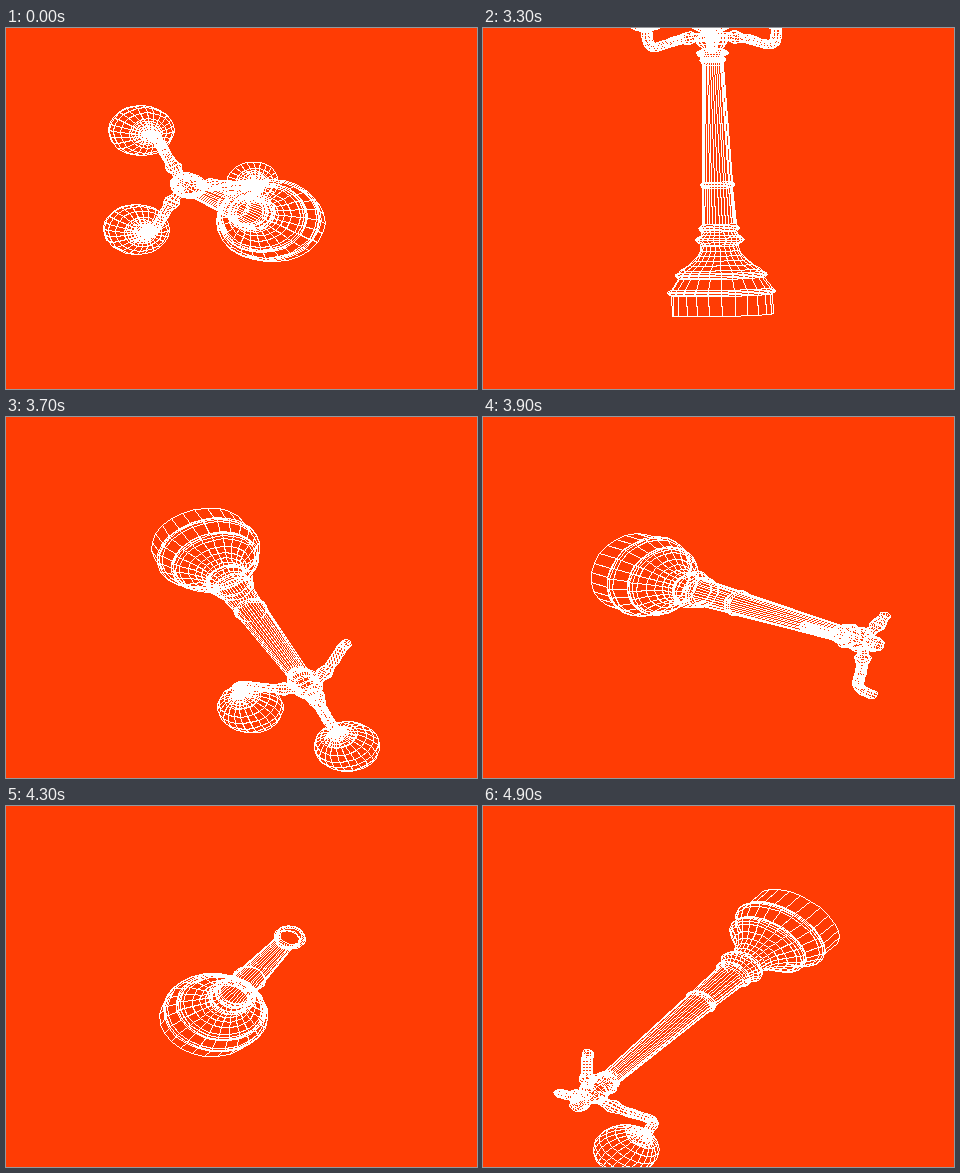
An HTML page with a canvas for the animation above (5 s loop, 471 by 361 pixels).

```html
<!DOCTYPE html>
<html>
<head>
<meta charset="utf-8">
<style>
html, body { margin: 0; width: 100%; height: 100%; overflow: hidden; background: #ff3c04; }
canvas { display: block; }
</style>
</head>
<body>
<canvas id="stage" width="471" height="361"></canvas>
<script>
const W = 471, H = 361, MID = W / 2, SQUASH = H / W;
const LOOP = 5000, HOLD = 3000, STEP = 100;
const REACH = 75, GLOBE = 33;
const OUTER = -1, INNER = 1, BOTH = 0;   // which faces of a mesh are drawn
const ctx = document.getElementById('stage').getContext('2d');
const image = ctx.createImageData(W, H);
const pixels = new Uint32Array(image.data.buffer);
const BACK = 0xff043cff, INK = 0xffffffff;

const mix = (a, b, k) => a + (b - a) * k;
const mixAll = (a, b, k) => a.map((v, i) => mix(v, b[i], k));
const dot = (a, b) => a[0] * b[0] + a[1] * b[1] + a[2] * b[2];
const scale = (a, k) => a.map(v => v * k);
const add = (a, b) => a.map((v, i) => v + b[i]);
const unit = a => scale(a, 1 / Math.hypot(...a));
const cross = (a, b) => [a[1] * b[2] - a[2] * b[1], a[2] * b[0] - a[0] * b[2], a[0] * b[1] - a[1] * b[0]];

function slerp(a, b, k) {
  a = unit(a);
  b = unit(b);
  const angle = Math.acos(dot(a, b)), s = Math.sin(angle);
  return add(scale(a, Math.sin((1 - k) * angle) / s), scale(b, Math.sin(k * angle) / s));
}

// Turned profiles are lists of [height, radius]
const curve = (n, fn) => Array.from({ length: n + 1 }, (_, i) => fn(i / n));
const bead = (h, r, bulge, half) =>
  curve(4, k => [h + half * (2 * k - 1), r + bulge * Math.sin(Math.PI * k)]);
const flare = (h0, h1, r0, r1) => curve(5, k => [mix(h0, h1, k), r1 + (r0 - r1) * (1 - k) ** 2]);

const BASE = [[-139, 50.5], ...bead(-109, 50.5, 3.5, 4), ...bead(-87, 43, 3, 4),
  ...flare(-80, -49, 40, 19), ...bead(-41, 18.5, 6, 6), ...bead(-26, 17.5, 3, 4)];
const SHAFT = [[-20, 17], ...bead(31, 15, 2, 4), [187, 10.5], ...bead(194, 11, 2, 3), ...bead(203, 11, 5, 5)];
const HUB = [...bead(220, 10, 6, 11), ...bead(243, 7, 3, 8)];
const FINIAL = [[251, 7], ...bead(278, 7, 8, 6)];
const CUP = curve(4, k => [231 + 11 * k, 5 + 11 * k]);
const SPHERE = curve(10, k => [-GLOBE * Math.cos(Math.PI * k), GLOBE * Math.sin(Math.PI * k)]);
// Arm centre line with tube radius: a dip, an upturned end and one knob
const ARM = curve(20, k => {
  const d = 10 + (REACH - 10) * Math.sin(k * Math.PI / 2);
  const h = 224 + 9 * k ** 3 - 16 * Math.sin(Math.PI * k * k);
  return [d, h, 5.5 + 3.5 * Math.exp(-(((d - 27) / 4) ** 2))];
});

// axis: post direction, side: first arm, hub: 0..1,
// grown: each arm (0..1) and then its globe (1..2); the last one is the top globe
const pose = (t, axis, side, hub, grown) => ({ t, axis, side, hub, grown });
const REST = pose(0, [-.25, -.14, -.957], [.96, 0, -.27], 1, [1.25, 2, 2, 0]);
const POSES = [
  pose(3000, [.193, .75, -.63], [.97, -.05, .24], 1, [2, 2, 2, 2]),
  pose(3300, [-.03, -1, -.04], [0, 0, -1], 1, [2, 2, 2, 2]),
  pose(3700, [.3, .53, -.79], [.36, .74, .58], 1, [2, .75, 2, 0]),
  pose(4100, [.85, -.085, -.52], [0, 1, -.16], 0, [0, 0, 0, 0]),
  pose(4600, [-.8, -.3, -.52], [.44, -.82, -.2], 0, [1.28, 0, 0, 0]),
  pose(4900, [-.57, .63, -.53], [.8, .63, -.11], 1, [2, .65, .65, 0])
];

function poseAt(t) {
  if (t < HOLD) return REST;
  const i = POSES.findIndex(p => p.t >= t);
  if (POSES[i].t === t) return POSES[i];
  const p = POSES[i - 1], q = POSES[i], k = (t - p.t) / (q.t - p.t);
  return pose(t, slerp(p.axis, q.axis, k), mixAll(p.side, q.side, k),
    mix(p.hub, q.hub, k), mixAll(p.grown, q.grown, k));
}

// Hard-edged line one pixel wide
function line(p, q) {
  let x = Math.floor(MID + p[0]), y = Math.floor((MID + p[1]) * SQUASH);
  const x1 = Math.floor(MID + q[0]), y1 = Math.floor((MID + q[1]) * SQUASH);
  const dx = Math.abs(x1 - x), dy = -Math.abs(y1 - y);
  const sx = x < x1 ? 1 : -1, sy = y < y1 ? 1 : -1;
  let err = dx + dy;
  for (;;) {
    if (x >= 0 && x < W && y >= 0 && y < H) pixels[y * W + x] = INK;
    if (x === x1 && y === y1) return;
    const e = 2 * err;
    if (e >= dy) { err += dy; x += sx; }
    if (e <= dx) { err += dx; y += sy; }
  }
}

function ring(centre, u, v, r, count) {
  return Array.from({ length: count }, (_, i) => {
    const a = i / count * 2 * Math.PI;
    return add(centre, add(scale(u, r * Math.cos(a)), scale(v, r * Math.sin(a))));
  });
}

function mesh(rings, faces) {
  for (let j = 1; j < rings.length; j++) {
    const low = rings[j - 1], high = rings[j];
    low.forEach((a, i) => {
      const n = (i + 1) % low.length, b = low[n], c = high[n], d = high[i];
      // z of the face normal, from the two diagonals
      const z = (c[0] - a[0]) * (d[1] - b[1]) - (c[1] - a[1]) * (d[0] - b[0]);
      if (z * faces < 0) return;
      line(a, b);
      line(b, c);
      line(c, d);
      line(d, a);
    });
  }
}

function lathe(profile, count, faces, origin, [axis, u, v]) {
  mesh(profile.map(([h, r]) => ring(add(origin, scale(axis, h)), u, v, r, count)), faces);
}

function globe(share, height, foot, frame) {
  const rows = Math.ceil(share * 10 - 1e-6);
  if (rows > 0) lathe(SPHERE.slice(0, rows + 1), 24, INNER, add(foot, scale(frame[0], height)), frame);
}

function arm(share, [axis, out, across]) {
  const path = ARM.slice(0, Math.round(share * ARM.length));
  mesh(path.map(([d, h, r], i) => {
    const a = ARM[Math.max(0, i - 1)], b = ARM[Math.min(ARM.length - 1, i + 1)];
    const normal = unit(add(scale(out, a[1] - b[1]), scale(axis, b[0] - a[0])));
    return ring(add(scale(out, d), scale(axis, h)), across, normal, r, 10);
  }), BOTH);
}

function draw(p) {
  pixels.fill(BACK);
  const axis = unit(p.axis);
  const u = unit(add(p.side, scale(axis, -dot(p.side, axis))));
  const v = cross(axis, u), frame = [axis, u, v], centre = [0, 0, 0];
  const hub = p.hub > .3, top = p.grown[3] - 1;
  lathe(BASE, 24, OUTER, centre, frame);
  lathe(SHAFT, 32, OUTER, centre, frame);
  if (hub) lathe(HUB, 16, BOTH, centre, frame);
  for (let i = 0; i < 3; i++) {
    const a = i * 2 * Math.PI / 3, grown = p.grown[i];
    const out = add(scale(u, Math.cos(a)), scale(v, Math.sin(a)));
    const side = [axis, out, cross(axis, out)], foot = scale(out, REACH);
    if (hub) arm(Math.min(1, grown), side);
    if (grown > 1) lathe(CUP, 16, BOTH, foot, side);
    globe(grown - 1, 265, foot, side);
  }
  if (top > 0) lathe(FINIAL, 16, BOTH, centre, frame);
  globe(top, 317, centre, frame);
  ctx.putImageData(image, 0, 0);
}

let shown = -1;
const start = performance.now();
function tick() {
  const t = Math.max(0, performance.now() - start) % LOOP;
  const step = t < HOLD ? 0 : Math.floor(t / STEP) * STEP;
  if (step !== shown) draw(poseAt(shown = step));
  requestAnimationFrame(tick);
}
tick();
</script>
</body>
</html>
```
